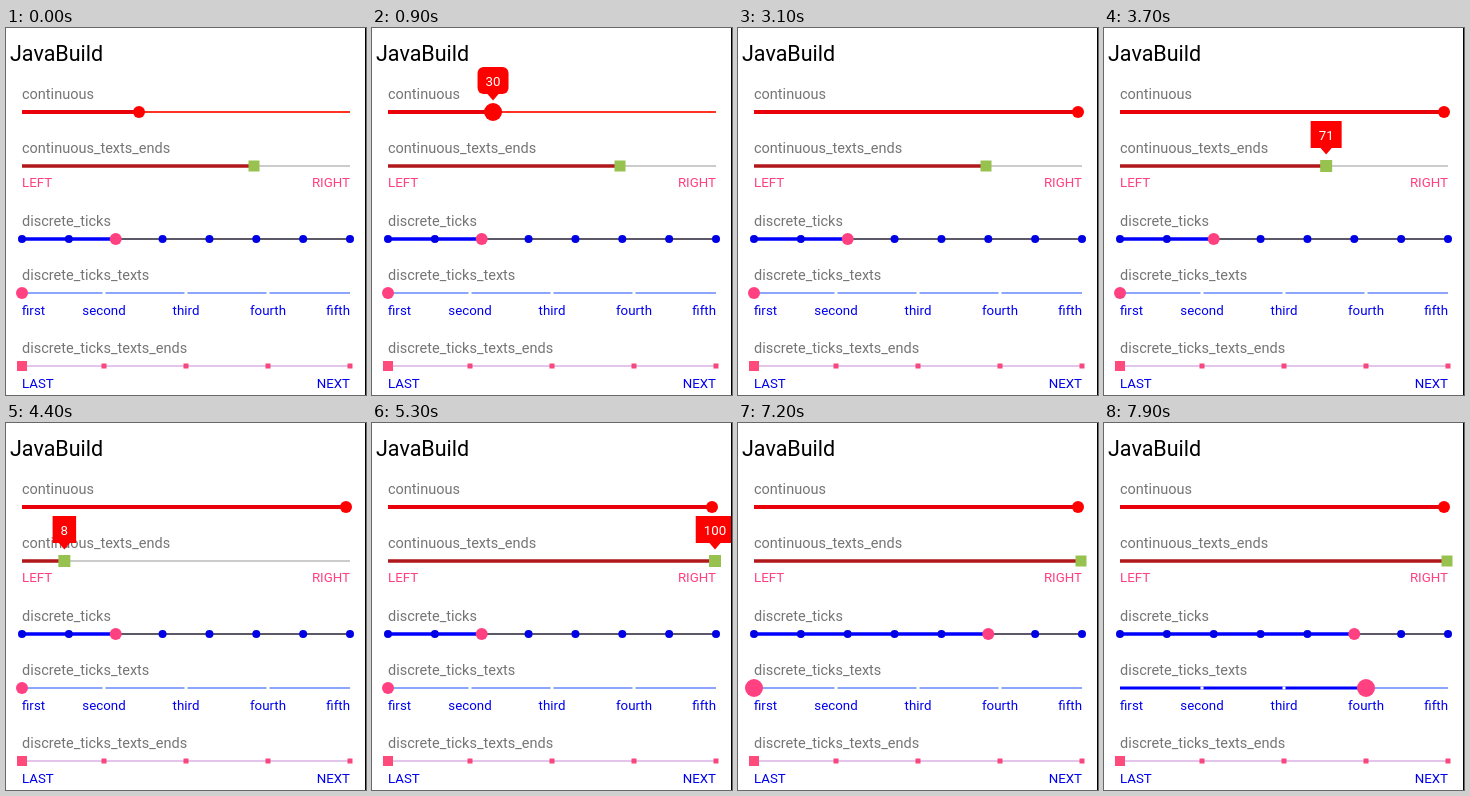
An HTML page for the animation above (8 s loop, 360x367 px).

```html
<!DOCTYPE html>
<html lang="en">
<head>
<meta charset="utf-8">
<style>
  html, body { margin: 0; width: 100%; height: 100%; overflow: hidden; background: #fff; }
  svg { display: block; font: 13.3px Roboto, sans-serif; }
  .title { font-size: 21.5px; }
  .name { font-size: 14.5px; fill: #757575; }
  .pink { fill: #ff4081; }
  .blue { fill: #0000f0; }
  .mid { text-anchor: middle; }
  .end { text-anchor: end; }
</style>
</head>
<body>
<svg id="stage" width="360" height="367" viewBox="0 0 360 367"></svg>
<script>
const LOOP = 8000, LEFT = 16, WIDTH = 328;
const stage = document.getElementById('stage');

function set(node, attrs) {
  for (const key in attrs) node.setAttribute(key, attrs[key]);
  return node;
}
function add(tag, attrs, parent = stage) {
  return parent.appendChild(set(document.createElementNS('http://www.w3.org/2000/svg', tag), attrs));
}
function text(x, y, label, cls) {
  add('text', { x, y, class: cls }).textContent = label;
}
function line(y, color, width) {
  return add('line', { x1: LEFT, x2: LEFT + WIDTH, y1: y, y2: y, stroke: color, 'stroke-width': width });
}
function dot(square, fill) {
  return add(square ? 'rect' : 'circle', { fill });
}
function place(node, x, y, r) {
  set(node, node.tagName === 'rect'
    ? { x: x - r, y: y - r, width: 2 * r, height: 2 * r }
    : { cx: x, cy: y, r });
}

// Keys are [time, value] pairs; hop keeps each value until the next key.
function valueAt(keys, t, hop) {
  let i = keys.length - 1;
  while (i > 0 && keys[i][0] > t) i--;
  const [t0, a] = keys[i], next = keys[i + 1];
  if (hop || !next || t < t0) return a;
  return a + (next[1] - a) * (t - t0) / (next[0] - t0);
}

const sliders = [
  { name: 'continuous', y: 84, track: ['#ff3320', 2], bar: ['#e8000a', 4], thumb: '#ff0000',
    size: [6, 9], press: [250, 2850], bubble: { fill: '#ff0000', top: 39, round: 6 },
    keys: [[0, 133], [250, 133], [600, 100], [800, 114.5], [900, 121], [1300, 135],
           [1700, 106], [1900, 118], [2000, 137], [2650, 340]] },
  { name: 'continuous_texts_ends', y: 138, track: ['#9a9a9a', 1.2], bar: ['#b0181c', 3.5], thumb: '#97c24f',
    square: true, size: [5.5, 6], press: [3600, 5400], bubble: { fill: '#ff0000', top: 93, round: 0 },
    keys: [[0, 248], [3650, 248], [4100, 20], [4200, 26], [4300, 42], [4400, 58], [5200, 343]] },
  { name: 'discrete_ticks', y: 211, track: ['#5c5868', 2], bar: ['#0000ff', 3.5], thumb: '#ff4081',
    size: [6, 9], press: [5600, 6900], bubble: { fill: '#0000ff', top: 166, round: 0 },
    steps: 7, max: 200, tick: { fill: '#0000e6', r: 4 },
    keys: [[0, 2], [5800, 3], [6100, 4], [6500, 5]] },
  { name: 'discrete_ticks_texts', y: 265, track: ['#6688ff', 1.5], bar: ['#0000ff', 3], thumb: '#ff4081',
    size: [6, 9], press: [7200, LOOP], steps: 4, tick: { fill: '#ffffff', r: 1.5, square: true, inner: true },
    keys: [[0, 0], [7350, 1], [7550, 2], [7750, 3]] },
  { name: 'discrete_ticks_texts_ends', y: 338, track: ['#e3c4ea', 2], bar: ['#ff4081', 2], thumb: '#ff4a7c',
    square: true, size: [5, 5], press: [LOOP, LOOP], steps: 4, tick: { fill: '#f8477c', r: 2.5, square: true },
    keys: [[0, 0]] }
];

text(4, 33, 'JavaBuild', 'title');
for (const s of sliders) {
  text(LEFT, s.y - 13, s.name, 'name');
  line(s.y, ...s.track);
  s.progress = line(s.y, ...s.bar);
  if (s.tick) {
    const skip = s.tick.inner ? 1 : 0;
    for (let i = skip; i <= s.steps - skip; i++)
      place(dot(s.tick.square, s.tick.fill), LEFT + WIDTH * i / s.steps, s.y, s.tick.r);
  }
  s.knob = dot(s.square, s.thumb);
}
text(LEFT, 159, 'LEFT', 'pink');
text(344, 159, 'RIGHT', 'pink end');
['first', 'second', 'third', 'fourth', 'fifth'].forEach((word, i) =>
  text(LEFT + WIDTH * i / 4, 287, word, 'blue ' + (i === 0 ? '' : i === 4 ? 'end' : 'mid')));
text(LEFT, 360, 'LAST', 'blue');
text(344, 360, 'NEXT', 'blue end');

// Bubbles sit above everything else.
for (const { bubble: b } of sliders) {
  if (!b) continue;
  b.group = add('g', { fill: b.fill });
  b.box = add('rect', { y: b.top, height: 27, rx: b.round }, b.group);
  add('path', { d: `M-6 ${b.top + 26.5}h12l-6 7z` }, b.group);
  b.label = add('text', { y: b.top + 18.5, fill: '#fff', class: 'mid' }, b.group);
}
add('rect', { x: 359, y: 0, width: 1, height: 367 });

function draw(t) {
  for (const s of sliders) {
    const pos = valueAt(s.keys, t, s.steps);
    const x = s.steps ? LEFT + WIDTH * pos / s.steps : pos;
    const pressed = t >= s.press[0] && t < s.press[1];
    set(s.progress, { x2: x });
    place(s.knob, x, s.y, s.size[+pressed]);
    const b = s.bubble;
    if (!b) continue;
    // The number trails a dragged thumb by a tenth of a second.
    const value = Math.round(s.steps ? s.max * pos / s.steps
      : 100 * (valueAt(s.keys, t - 100) - LEFT) / WIDTH);
    const width = 16 + 7.5 * String(value).length;
    set(b.group, { visibility: pressed ? 'visible' : 'hidden', transform: `translate(${x})` });
    set(b.box, { x: -width / 2, width });
    b.label.textContent = value;
  }
}

const start = performance.now();
function frame() {
  draw((performance.now() - start) % LOOP);
  requestAnimationFrame(frame);
}
frame();
</script>
</body>
</html>
```
